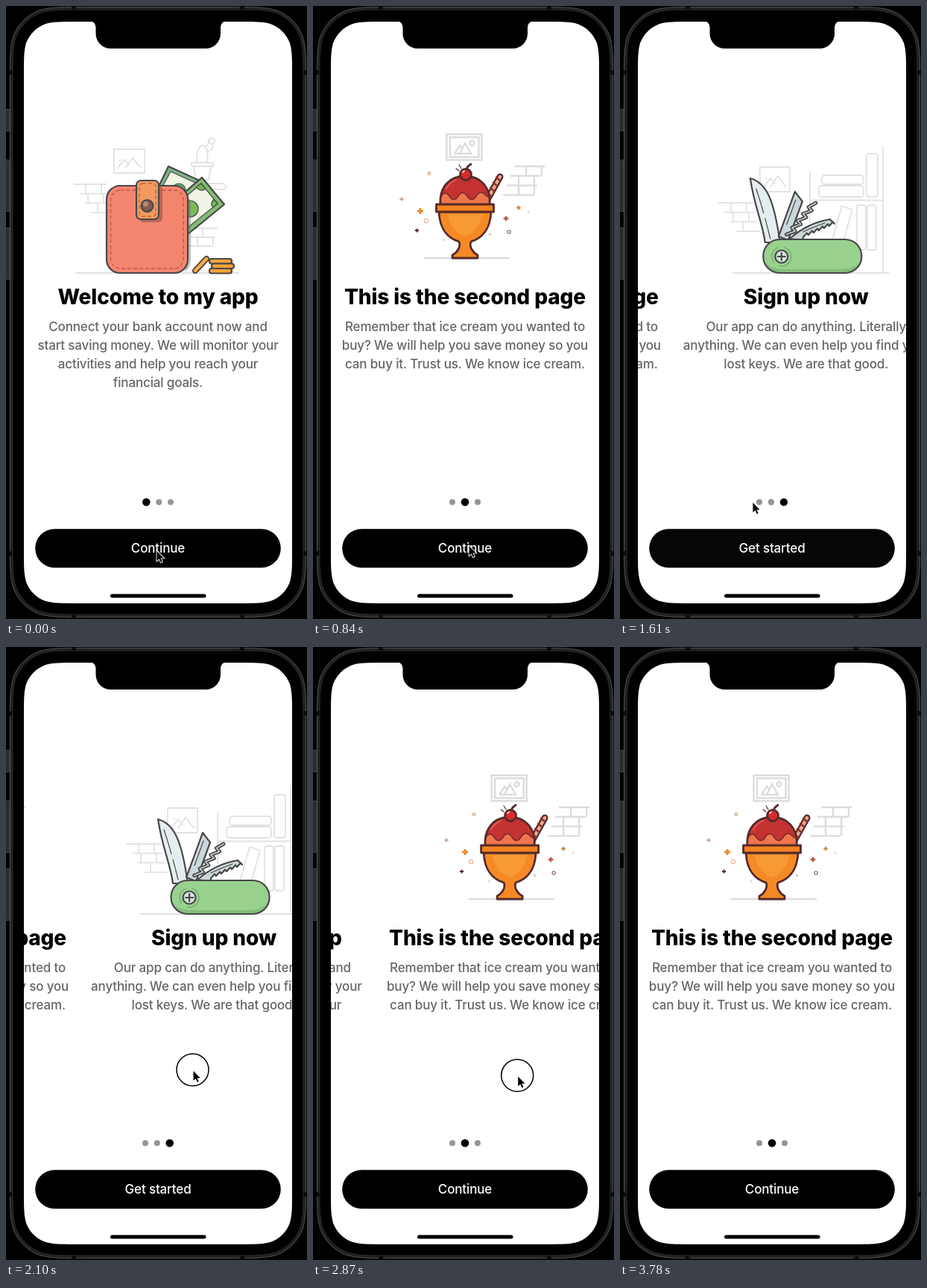
Recreate the animation shown at these times as an HTML page. Size 404 by 822 pixels, loop 4.27 s.

```html
<!DOCTYPE html>
<html lang="en">
<head>
<meta charset="utf-8">
<title>Onboarding</title>
<style>
html, body { margin: 0; width: 100%; height: 100%; overflow: hidden; background: #000; }
svg { display: block; width: 404px; height: 822px; }
text { font-family: Inter, "Open Sans", sans-serif; text-anchor: middle; }
.title { font-size: 28px; font-weight: 800; letter-spacing: -.1px; }
.body, .label { font-size: 17px; font-weight: 500; letter-spacing: -.15px; }
.body { fill: #666; }
.label { fill: #fff; }
.faint { fill: none; stroke: #e2e2e2; stroke-width: 1.8; stroke-linejoin: round; stroke-linecap: round; }
.bold { stroke: #dcdcdc; stroke-width: 2.4; stroke-linecap: butt; stroke-linejoin: miter; }
.ink { stroke: #484848; stroke-width: 2.2; stroke-linejoin: round; stroke-linecap: round; }
.choc { stroke: #552b2b; stroke-width: 2.8; stroke-linejoin: round; stroke-linecap: round; }
.thin { stroke-width: 1.2; }
.stitch { fill: none; stroke-width: 1.4; stroke-dasharray: 5 3; }
</style>
</head>
<body>
<svg viewBox="0 0 404 822">
  <defs>
    <clipPath id="screen"><path id="screenShape"/></clipPath>
    <clipPath id="handle"><rect x="221.5" y="313" width="132" height="45" rx="22"/></clipPath>
    <clipPath id="scoop"><path d="M171 267C169 242 184 228 204 228S239 242 237 267Z"/></clipPath>
  </defs>

  <rect width="404" height="822"/>
  <g id="sideKeys" fill="#2b2b2b" stroke="#454545"></g>
  <path id="frame" fill="#202020" stroke="#555"/>
  <g id="seams" fill="#0c0c0c"></g>
  <path id="bezel" stroke="#303030" stroke-width=".8"/>

  <g clip-path="url(#screen)">
    <rect x="24" y="21" width="360" height="780" fill="#fff"/>
    <g id="pages">
      <g>
        <g class="faint" id="room1">
          <path d="M145 192H186V224H145ZM150 217L159 206 165 213M160 217L170 204 181 217M152 207h2"/>
          <path d="M249 210H278V215H249ZM252 215L255 233H272L275 215M257 210C254 198 259 187 264 187S273 198 269 210M269 194C276 195 279 191 277 186M269 188L273 181"/>
          <circle cx="276" cy="181" r="4"/>
          <path d="M247 238H291a4 4 0 0 1 0 8H247M94 358H313"/>
        </g>
        <g class="ink">
          <path d="M218 215L264 236 244 285 200 252Z" fill="#7db286"/>
          <path class="thin" d="M221 222L254 237 239 272 208 246Z" fill="#f0f4e2"/>
          <circle class="thin" cx="232" cy="247" r="9" fill="#68a36c"/>
          <path d="M263 230L293 266 244 306 221 266Z" fill="#84bb74"/>
          <path class="thin" d="M262 238L284 265 244 297 228 267Z" fill="#f1f4e4"/>
          <circle class="thin" cx="247" cy="272" r="11" fill="#79bd55"/>
          <path class="thin" d="M255 243Q262 250 268 245L262 238ZM279 259Q273 266 278 270L284 265Z" fill="#74b455"/>
        </g>
        <path d="M244 257Q248 258 248 264V342Q247 352 240 356Z" fill="#666" opacity=".4"/>
        <rect class="ink" x="135" y="241" width="109" height="117" rx="18" fill="#f4856e"/>
        <rect class="stitch" x="140.5" y="247" width="97.5" height="105" rx="13" stroke="#bb5b4b"/>
        <rect x="179" y="240" width="31" height="50" rx="6" fill="#7b4a42" opacity=".5"/>
        <rect class="ink" x="175" y="234" width="30" height="52" rx="6" fill="#f39a62"/>
        <rect class="stitch" x="179" y="238" width="22" height="44" rx="4" stroke="#b7683e"/>
        <circle class="ink" cx="189.5" cy="268" r="8" fill="#80594d"/>
        <circle cx="187.5" cy="265.5" r="3.5" fill="#b28977"/>
        <path d="M254 355L269 339" stroke="#484038" stroke-width="8" stroke-linecap="round"/>
        <path d="M254 355L269 339" stroke="#f4ad45" stroke-width="4.5" stroke-linecap="round"/>
        <g class="ink" id="coins" fill="#f5a33a"></g>
      </g>

      <g>
        <g class="faint bold" id="room2">
          <path d="M179.5 172H226.5V206.5H179.5Z"/>
          <path d="M184 176H222.5V202.5H184ZM190 198L197 187 201 192M197 198L204 184 212 198ZM190 198H212"/>
          <circle cx="213.5" cy="184" r="3"/>
          <path d="M149 338H264"/>
        </g>
        <g id="straw" stroke-linecap="round">
          <path d="M231 265L251 229" stroke="#552b2b" stroke-width="9"/>
          <path d="M231 265L251 229" stroke="#e9a78f" stroke-width="4.5"/>
        </g>
        <g clip-path="url(#scoop)">
          <rect x="165" y="225" width="78" height="45" fill="#ef764c"/>
          <path d="M165 220H243V252q-6 8-12 1t-12 2-12 0-12 0-12 0-12 2H165Z" fill="#c43232" stroke="#742c2b" stroke-width="1.5"/>
          <path d="M179 245Q183 236 192 233" fill="none" stroke="#e5584d" stroke-width="2" stroke-linecap="round"/>
        </g>
        <path class="choc" d="M171 267C169 242 184 228 204 228S239 242 237 267M206 219Q207 215 212 212" fill="none"/>
        <circle class="choc" cx="205" cy="226" r="7.5" fill="#d92a2f"/>
        <path d="M201 223L203 221" stroke="#fff" stroke-width="1.6" stroke-linecap="round"/>
        <path class="choc thin" d="M199 218L196 213M196 221L192 218"/>
        <path class="choc" d="M169 276C170 301 183 312 196 316 199 323 193 331 187 334V338H221V334C215 331 209 323 212 316 225 312 238 301 239 276Z" fill="#f58a25"/>
        <path d="M181 279Q184 302 204 309 224 302 227 279Z" fill="#f79a33"/>
        <rect class="choc" x="165.5" y="266" width="77" height="10" fill="#f58220"/>
        <g id="sparks" fill="none" stroke-width="1.8"></g>
      </g>

      <g>
        <g transform="translate(-75)">
          <g class="faint" id="room3">
            <path d="M217 216H257V249H217ZM222 243L231 231 237 238M231 243L241 228 252 243M225 231h1"/>
            <path d="M284 222V290M284 260.5H382M382 188V358M181 358H390M327 268L341 273 326 326 312 321Z"/>
          </g>
          <g class="ink" id="tools">
            <path d="M204 231C226 237 236 260 244 317H224C220 288 210 271 204 231Z" fill="#e4edef"/>
            <path class="thin" d="M212 245Q222 275 231 312" fill="none" stroke-dasharray="34 8"/>
            <path d="M264 249L274 262 255 314 242 309Z" fill="#cbd7da"/>
            <path class="thin" d="M265 260L253 293"/>
          </g>
          <g clip-path="url(#handle)">
            <rect x="220" y="312" width="136" height="47" fill="#99d18f"/>
            <path d="M220 338Q228 353 249 353H329Q348 352 356 337V360H220Z" fill="#83bd7b"/>
            <circle cx="246" cy="336" r="13" fill="none" stroke="#76ad70" stroke-width="1.5" stroke-dasharray="24 8"/>
          </g>
          <rect class="ink" x="221.5" y="313" width="132" height="45" rx="22" fill="none"/>
          <circle class="ink" cx="246" cy="336" r="8.5" fill="#d5e1df"/>
          <path class="ink" d="M241 336H251M246 331V341"/>
        </g>
      </g>
    </g>
    <path d="M112 20a8.500 8.500 0 0 1 8.500 8.500V37a20 20 0 0 0 20 20H268a20 20 0 0 0 20-20V28.500a8.500 8.500 0 0 1 8.500-8.500Z"/>
    <g id="dots"></g>
    <rect id="button" x="39.200" y="701.200" width="329.600" height="52" rx="26"/>
    <text id="label" class="label" x="204" y="733"></text>
    <rect x="140" y="788.500" width="128.500" height="5" rx="2.500"/>
  </g>
  <g id="pointer">
    <circle id="ring" cx="-.5" cy="-.5" r="21.500" fill="none" stroke="#000" stroke-width="1.500"/>
    <path transform="translate(.5 1) scale(.9)" d="M0 0V14.500L3.400 11.400 5.800 16.800 8 15.800 5.700 10.500H10.300Z" stroke="#fff" stroke-width="2" paint-order="stroke"/>
  </g>
</svg>
<script>
const LOOP = 4270, STEP = 70, PAGE_W = 360;
const $ = id => document.getElementById(id);

function add(parent, tag, attrs, text = "") {
  const el = document.createElementNS("http://www.w3.org/2000/svg", tag);
  for (const key in attrs) el.setAttribute(key, attrs[key]);
  el.textContent = text;
  return parent.appendChild(el);
}
const box = (id, x, y, width, height, rx = 0) => add($(id), "rect", { x, y, width, height, rx });

// Rectangle whose corners ease into the straight edges.
function squircle(x, y, w, h, r) {
  const half = [[1.53, 0], [1.09, 0], [.87, 0], [.63, .07], [.37, .17]];
  const curve = [...half, ...half.map(([u, v]) => [v, u]).reverse()];
  let a = [0, 1], b = [1, 0], d = "";
  for (const [cx, cy] of [[x, y], [x + w, y], [x + w, y + h], [x, y + h]]) {
    const pts = curve.map(([u, v]) => `${cx + r * (u * a[0] + v * b[0])} ${cy + r * (u * a[1] + v * b[1])}`);
    d += `${d ? "L" : "M"}${pts[0]}C${pts.slice(1).join(" ")}`;
    [a, b] = [[-b[0], -b[1]], a];
  }
  return d + "Z";
}
$("screenShape").setAttribute("d", squircle(24, 21, 360, 780, 45));
$("frame").setAttribute("d", squircle(5.5, 1.5, 397, 818, 62));
$("bezel").setAttribute("d", squircle(9, 5, 390, 811, 59));
for (const [y, h] of [[138.5, 29], [206.5, 69], [297.5, 69]]) box("sideKeys", -3, y, 8, h, 1);
for (const x of [88, 314]) for (const y of [1, 816]) box("seams", x, y, 6, 4);
for (const x of [5, 399]) for (const y of [86, 731]) box("seams", x, y, 4, 6);

// Courses of bricks; each row's ends shift by dl and dr.
function bricks(id, left, right, y, rows, h, dl, dr) {
  let d = "";
  for (let i = 0; i <= rows; i++) {
    const l = left + dl * i, r = right + dr * i, top = y + h * i;
    d += `M${l} ${top}H${r}`;
    if (i < rows) for (let x = l + (i % 2 ? 11 : 16); x < r; x += 21) d += `M${x} ${top}v${h}`;
  }
  add($(id), "path", { d });
}
bricks("room1", 91, 134, 239, 3, 12.7, 8, 0);
bricks("room1", 248, 283, 298, 2, 12, -2, -4);
bricks("room2", 270, 311, 215, 3, 12.8, -5, -5);
bricks("room3", 162, 207, 264, 3, 12.7, 8, 3);

for (let i = 0; i < 3; i++) box("coins", 273 + i % 2 * 3, 339 + 6.5 * i, 30, 6.5, 3);
for (let i = 0; i < 5; i++)
  add($("straw"), "path", { d: `M${230 + 4 * i} ${258 - 7 * i}l5 4`, stroke: "#8c3030", "stroke-width": 2.6 });

box("room3", 300, 227, 56, 12, 4);
box("room3", 296, 241, 60, 15, 4);
box("room3", 360, 198, 15, 58, 3);
for (const x of [347, 361]) box("room3", x, 267, 12, 60, 3);

let screw = "M292 264", teeth = "";
for (let i = 1; i <= 9; i++) screw += `L${290 - 3.7 * i + (i % 2 ? -4 : 4)} ${265 + 4.6 * i}`;
for (let i = 0; i < 6; i++) teeth += "l-2-2.500-5 5.500";
for (const [stroke, width] of [["#484848", 5], ["#cbd7da", 1.5]])
  add($("tools"), "path", { d: screw, fill: "none", style: `stroke:${stroke};stroke-width:${width}` });
add($("tools"), "path", { d: `M257 312Q281 291 311 286L317 292${teeth}V314Z`, fill: "#cbd7da" });
add($("tools"), "path", { d: "M275 303Q289 296 304 291", fill: "none", class: "thin" });

const plus = (x, y, r, stroke) =>
  add($("sparks"), "path", { d: `M${x - r} ${y}h${2 * r}M${x} ${y - r}v${2 * r}`, stroke, "stroke-width": r * .75 });
const bubble = (cx, cy, r, stroke) => add($("sparks"), "circle", { cx, cy, r, stroke, "stroke-width": 1.3 });
plus(119, 259, 2.6, "#cda58f");
plus(144, 275, 4, "#e98b31");
plus(139.5, 301, 2.6, "#57302d");
plus(276, 270.5, 2.8, "#d98237");
plus(259, 285, 3.3, "#b75c43");
plus(237.5, 306.5, 2, "#d2c7c1");
bubble(156, 224.5, 1.8, "#d9a06c");
bubble(152, 288, 2.6, "#f2bb95");
bubble(263, 303, 2.1, "#98706b");
bubble(289, 276, 1, "#ead8ca");
bubble(176, 314, 1, "#f3d2bc");

const copy = [
  ["Welcome to my app", "Connect your bank account now and", "start saving money. We will monitor your",
    "activities and help you reach your", "financial goals."],
  ["This is the second page", "Remember that ice cream you wanted to", "buy? We will help you save money so you",
    "can buy it. Trust us. We know ice cream."],
  ["Sign up now", "Our app can do anything. Literally", "anything. We can even help you find your",
    "lost keys. We are that good."]
];
const pages = [...$("pages").children];
pages.forEach((page, i) => copy[i].forEach((line, row) => add(page, "text", {
  class: row ? "body" : "title", x: 204, y: row ? 411 + 25 * row : 399.5
}, line)));
const dots = [0, 1, 2].map(() => add($("dots"), "circle", { cy: 665.3 }));

// Progress helpers, all from 0 to 1.
const span = (t, from, to) => Math.min(1, Math.max(0, (t - from) / (to - from)));
const wave = p => (1 - Math.cos(Math.PI * p)) / 2;
const smooth = (t, from, to) => wave(span(t, from, to));
const turn = (t, from) => wave(span(t, from, from + 340) ** 1.36);
const settle = (t, from, to) => 1 - (1 - span(t, from, to)) ** 2;

const TAP1 = 500, TAP2 = 1330;

function scrollAt(t) {
  const page = turn(t, TAP1) + turn(t, TAP2) - settle(t, 2041, 2576);
  const peek = smooth(t, 2760, 2960) - smooth(t, 2975, 3405);
  return PAGE_W * page - 104 * peek;
}

// from, to, dx, dy
const moves = [
  [0, 560, 7, -7], [1050, 1120, -1, 4], [1400, 1890, -77.5, -159.5], [2030, 2100, 120.5, 0],
  [2100, 2450, 23, 7.5], [2590, 2730, -60, 0], [2760, 2960, 105, 0], [3150, 3430, 0, 15], [3500, 3710, -116, 198]
];
function pointerAt(t) {
  return moves.reduce(([x, y], [from, to, dx, dy]) => {
    const p = smooth(t, from, to);
    return [x + dx * p, y + dy * p];
  }, [202, 730]);
}

function draw(t) {
  const scroll = scrollAt(t);
  pages.forEach((page, i) => page.setAttribute("transform", `translate(${i * PAGE_W - scroll})`));

  const active = t < TAP1 ? 0 : t <= TAP2 ? 1 : t < 2520 ? 2 : 1;
  const focus = smooth(t, 630, 840) + smooth(t, 1400, 1680) - smooth(t, 2520, 2800);
  let x = 183;
  dots.forEach((dot, i) => {
    const r = 4 + 1.3 * Math.max(0, 1 - Math.abs(i - focus));
    dot.setAttribute("cx", x + r);
    dot.setAttribute("r", r);
    dot.setAttribute("fill", i === active ? "#000" : "#969696");
    x += 2 * r + 7.7;
  });

  const pressed = (t >= 420) - turn(t, TAP1) + (t >= 1260) - turn(t, TAP2);
  const shade = Math.round(51 * pressed);
  $("button").setAttribute("fill", `rgb(${shade},${shade},${shade})`);
  $("label").textContent = active === 2 ? "Get started" : "Continue";

  const touching = (t >= 1960 && t < 2170) || (t >= 2730 && t < 2940);
  $("pointer").setAttribute("transform", `translate(${pointerAt(t)})`);
  $("pointer").setAttribute("visibility", t < 3780 ? "visible" : "hidden");
  $("ring").setAttribute("opacity", touching ? 1 : 0);
}

const start = performance.now();
function tick() {
  const t = (performance.now() - start) % LOOP;
  draw(Math.floor(t / STEP) * STEP);
  requestAnimationFrame(tick);
}
draw(0);
requestAnimationFrame(tick);
</script>
</body>
</html>
```
